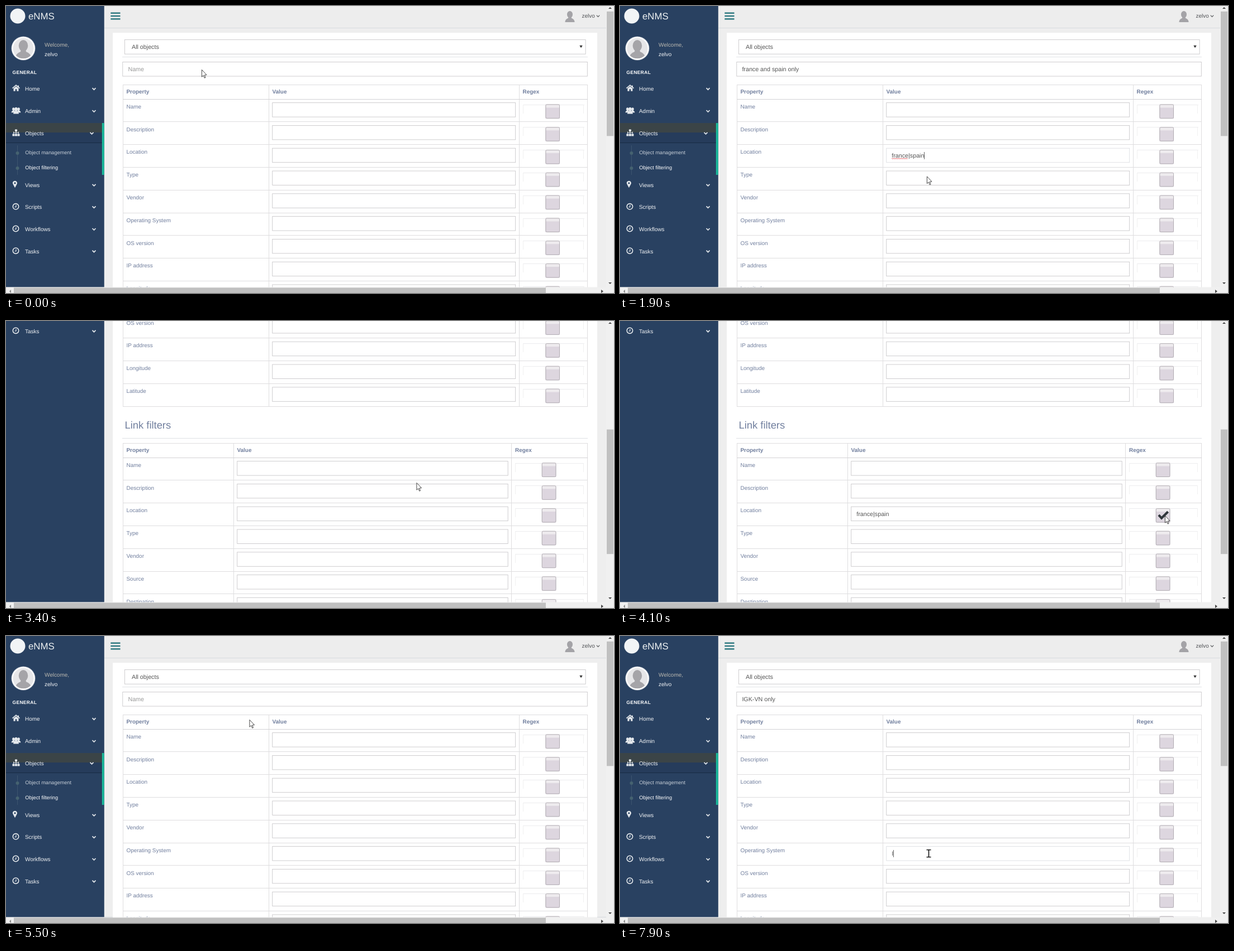
Recreate the animation shown at these times as an HTML page with a canvas. Size 1088 by 515 pixels, loop 8000 ms.

```html
<!DOCTYPE html>
<html lang="en">
<head>
<meta charset="utf-8">
<title>Object filtering</title>
<style>
  html, body { margin: 0; width: 100%; height: 100%; overflow: hidden; background: #eee; }
  canvas { display: block; }
</style>
</head>
<body>
<canvas id="stage" width="1088" height="515"></canvas>
<script>
const ctx = document.getElementById('stage').getContext('2d');
const LOOP = 8000, STEP = 100;
const VIEW_W = 1074, VIEW_H = 504.5, SIDE_W = 175.6, ROW = 40.8;
const NAVY = '#294161', LABEL = '#717f9e', INK = '#555', RULE = '#dedddf';
const USER = 'zelvo';
const FILTER_A = 'france and spain only', FILTER_B = 'IGK-VN only', PLACES = 'france|spain';
const COMMON = ['Name', 'Description', 'Location', 'Type', 'Vendor'];
const OBJECT_ROWS = [...COMMON, 'Operating System', 'OS version', 'IP address', 'Longitude', 'Latitude'];
const LINK_ROWS = [...COMMON, 'Source', 'Destination'];
const OBJECT_TABLE = { top: 140.5, valueX: 470, regexX: 918, boxX: 965.4 };
const LINK_TABLE = { top: 640.5, valueX: 407, regexX: 904.5, boxX: 958.8 };

const SCROLL = [[0, 0], [2900, 0], [3000, 1.2], [3100, 110], [3200, 250], [3300, 370], [3400, 422],
  [4200, 422], [4300, 480], [4400, 560], [4500, 587], [5400, 587], [5500, 0]];

// time, x, y, pointer shape used from that time on
const POINTER = [
  [0, 350, 114, 'arrow'], [100, 351, 117, 'beam'], [700, 351, 117, 'beam'], [900, 551, 277, 'beam'],
  [1800, 551, 277, 'beam'], [1900, 549, 305.5, 'arrow'], [2200, 986, 274, 'arrow'], [2300, 986, 274, 'arrow'],
  [2400, 900, 270, 'beam'], [2600, 818, 268, 'beam'], [2900, 818, 268, 'beam'], [3000, 818, 267, 'beam'],
  [3100, 800, 272, 'arrow'], [3400, 734.5, 290, 'arrow'], [3600, 650, 346, 'beam'], [3800, 650, 346, 'beam'],
  [3900, 800, 347, 'arrow'], [4000, 975, 349, 'arrow'], [4200, 975, 349, 'arrow'], [4500, 750, 410, 'arrow'],
  [4700, 654, 426, 'hand'], [4800, 654, 426, 'hand'], [4900, 656, 430, 'hand'], [5000, 760, 478, 'arrow'],
  [5100, 930, 330, 'arrow'], [5200, 1030, 171, 'arrow'], [5400, 1030, 171, 'arrow'],
  [5500, 435.5, 150, 'arrow'], [5800, 427, 141, 'arrow'], [5900, 427, 141, 'arrow'], [6000, 400, 114, 'beam'],
  [7100, 400, 114, 'beam'], [7600, 552.5, 390, 'beam'],
];

function track(keys, t) {
  let i = keys.length - 1;
  while (keys[i][0] > t) i--;
  const a = keys[i], b = keys[i + 1] || a;
  const k = b === a ? 0 : (t - a[0]) / (b[0] - a[0]);
  return a.slice(1).map((v, j) => typeof v === 'number' ? v + (b[j + 1] - v) * k : v);
}

// Characters visible at time t when typing runs from the first to the last keystroke
function typed(text, t, first, last) {
  const share = (t - first + STEP) / (last - first + STEP);
  return text.slice(0, Math.max(0, Math.ceil(share * text.length)));
}

function focusAt(t) {
  if (t >= 100 && t < 900 || t >= 6100 && t < 7700) return 'title';
  if (t >= 900 && t < 2300 || t >= 2500 && t < 3600) return 'objectLocation';
  if (t >= 3600 && t < 4100) return 'linkLocation';
  return t >= 7700 ? 'system' : '';
}

function stateAt(t) {
  const second = t >= 5500;
  // the last two letters follow after a pause
  const name = second
    ? typed(FILTER_B.slice(0, -2), t, 6300, 6700) + typed(FILTER_B.slice(-2), t, 6900, 7000)
    : typed(FILTER_A, t, 200, 700);
  return {
    name,
    focus: focusAt(t),
    location: second ? '' : typed(PLACES, t, 1000, 1600),
    selected: t >= 2600 && t < 3600,
    objectCheck: !second && t >= 2300,
    link: !second && t >= 3700 ? PLACES : '',
    linkCheck: !second && t >= 4100,
    system: t >= 7900 ? FILTER_B[0] : '',
    scroll: track(SCROLL, t)[0],
  };
}

let offset = 0;

function fill(x, y, w, h, color) {
  ctx.fillStyle = color;
  ctx.fillRect(x, y, w, h);
}
// soft: page rectangle at its exact place; rect: snapped to whole pixels
const soft = (x, y, w, h, color) => fill(x, y - offset, w, h, color);
const rect = (x, y, w, h, color) =>
  fill(Math.round(x), Math.round(y - offset), Math.round(w), Math.round(h), color);

function frame(x, y, w, h, color) {
  ctx.strokeStyle = color;
  ctx.lineWidth = .85;
  ctx.strokeRect(x + .4, y - offset + .4, w - .8, h - .8);
}

function font(size, bold) {
  ctx.font = `${bold ? 'bold ' : ''}${size}px "Liberation Sans", Arial, sans-serif`;
}
function text(str, x, y, color, size = 9.94, bold = false) {
  font(size, bold);
  ctx.fillStyle = color;
  ctx.fillText(str, x, y - offset);
}

function poly(points, color, stroke, width = 1, close = true) {
  ctx.beginPath();
  points.forEach(([x, y]) => ctx.lineTo(x, y));
  if (close) ctx.closePath();
  if (color) { ctx.fillStyle = color; ctx.fill(); }
  if (stroke) { ctx.strokeStyle = stroke; ctx.lineWidth = width; ctx.stroke(); }
}
function disc(x, y, rx, color, ry = rx) {
  ctx.beginPath();
  ctx.ellipse(x, y, rx, ry, 0, 0, 7);
  ctx.fillStyle = color;
  ctx.fill();
}
function at(x, y, draw) {
  ctx.save();
  ctx.translate(x, y);
  draw();
  ctx.restore();
}

const chevron = (x, y, color, size = 3, width = 1.7) =>
  poly([[x - size, y - size / 2], [x, y + size / 2], [x + size, y - size / 2]], null, color, width, false);

function person(x, y, s, color) {
  disc(x, y - 3.5 * s, 5 * s, color, 6.2 * s);
  ctx.fillStyle = color;
  ctx.beginPath();
  ctx.moveTo(x - 8.5 * s, y + 10.3 * s);
  ctx.quadraticCurveTo(x - 8.5 * s, y + 5 * s, x - 3 * s, y + 3 * s);
  ctx.lineTo(x - 2.5 * s, y);
  ctx.lineTo(x + 2.5 * s, y);
  ctx.lineTo(x + 3 * s, y + 3 * s);
  ctx.quadraticCurveTo(x + 8.5 * s, y + 5 * s, x + 8.5 * s, y + 10.3 * s);
  ctx.fill();
}

const ICON = '#e4e8ec';
const icons = {
  home() {
    poly([[-6.5, 0], [0, -5.5], [6.5, 0]], null, ICON, 1.7, false);
    poly([[-4.5, 0], [0, -3.5], [4.5, 0], [4.5, 5], [1.3, 5], [1.3, 1.5], [-1.3, 1.5], [-1.3, 5], [-4.5, 5]], ICON);
    fill(3, -5, 2, 3, ICON);
  },
  users() {
    for (const [x, y, s] of [[-4.6, -1, .45], [4.6, -1, .45], [0, 0, .58]]) person(x, y, s, ICON);
  },
  sitemap() {
    fill(-2, -6, 4, 4, ICON);
    for (const x of [-6.5, -2, 2.5]) fill(x, 2, 4, 4, ICON);
    fill(-5, -.5, 10, 1, ICON);
    for (const x of [-5, -.5, 4]) fill(x, -2, 1, 4, ICON);
  },
  marker() {
    ctx.beginPath();
    ctx.arc(-2, -2.5, 4, Math.PI * .9, Math.PI * 2.1);
    ctx.lineTo(-2, 6);
    ctx.fillStyle = ICON;
    ctx.fill();
    disc(-2, -2.5, 1.6, NAVY);
  },
  clock() {
    ctx.beginPath();
    ctx.arc(-.5, 0, 5.2, 0, 7);
    ctx.strokeStyle = ICON;
    ctx.lineWidth = 1.6;
    ctx.stroke();
    poly([[0, -3], [0, .8], [-2.5, .8]], null, ICON, 1.2, false);
  },
};
const MENU = [['Home', 148.7, 'home'], ['Admin', 188.5, 'users'], ['Objects', 228.4, 'sitemap'], ['Views', 321.3, 'marker'],
  ['Scripts', 360.8, 'clock'], ['Workflows', 400.5, 'clock'], ['Tasks', 440.2, 'clock']];

function drawSidebar() {
  fill(0, 0, SIDE_W, VIEW_H, NAVY);
  disc(21, 18 - offset, 13.5, '#f1f4f6');
  text('eNMS', 40, 23.7, '#ecf0f1', 16.83);

  disc(31, 76 - offset, 21.6, '#8a97a8');
  disc(31, 76 - offset, 20.9, '#fff');
  ctx.save();
  ctx.beginPath();
  ctx.arc(31, 76 - offset, 18.5, 0, 7);
  ctx.clip();
  soft(10, 50, 42, 50, '#e6e6e8');
  person(31, 77 - offset, 1.65, '#a5a4a8');
  ctx.restore();
  text('Welcome,', 69, 73.4, '#bab8b0');
  text(USER, 69, 90, '#f4f6f8');
  ctx.letterSpacing = '0.38px';
  text('GENERAL', 11.5, 121.5, '#fff', 8.42, true);
  ctx.letterSpacing = '0px';

  rect(0, 210, 172, 17, '#3b4447');
  rect(0, 227, 172, 18, '#263c5b');
  rect(0, 245, 172, 1, '#182a44');
  soft(171.8, 210, 3.8, 93, '#1abb9c');
  rect(20, 250, 1, 53, '#3c5570');
  disc(20.5, 264 - offset, 3, '#456270');
  disc(20.5, 291 - offset, 3, '#456270');
  text('Object management', 34.3, 266, '#c6ced7', 9.2);
  text('Object filtering', 34.3, 293, '#fff', 9.2);

  for (const [label, y, icon] of MENU) {
    at(18, y - 1 - offset, icons[icon]);
    text(label, 34, y + 3.6, '#f0f2f4');
    chevron(label === 'Objects' ? 153.5 : 157.5, y - offset, ICON);
  }
}

function drawHeader() {
  rect(176, 0, 898, 40, '#ededed');
  rect(176, 39, 898, 1, '#d8dbdf');
  for (let i = 0; i < 3; i++) soft(187.3, 11.4 + i * 5.3, 17.2, 2.6, '#357d84');
  person(1009, 18.7 - offset, 1, '#a4a3a7');
  text(USER, 1030.5, 21, '#515356');
  chevron(1059.5, 18 - offset, '#515356', 2.7, 1.1);
}

function squiggle(x, y, width) {
  const points = [];
  for (let i = 0; i <= width; i += 1.5) points.push([x + i, y - offset + (points.length % 2 ? 1 : -.5)]);
  poly(points, null, '#e0393e', .9, false);
}

function input(x, y, w, value = '', o = {}) {
  const height = 26.3, left = x + 10, base = y + 17;
  soft(x, y, w, height, '#fff');
  frame(x, y, w, height, o.focused ? '#dbdde1' : '#c6c4c7');
  font(10.71);
  const width = ctx.measureText(value).width;
  if (o.selected) rect(left, base - 10.5, width, 13, '#3397ef');
  if (value) text(value, left, base, o.selected ? '#fff' : INK, 10.71);
  else if (o.placeholder) text(o.placeholder, left, base, '#999', 10.71);
  if (o.spelling && value.length > 5) squiggle(left, base + 1.8, ctx.measureText('france').width);
  if (o.focused && !o.selected) rect(left + width, base - 10, 1, 13, '#666');
}

function checkbox(x, y, checked) {
  const size = 25.6;
  soft(x, y, size, size, '#ddd6df');
  soft(x, y, size, 6, '#eeebee');
  ctx.strokeStyle = '#aca8ad';
  ctx.lineWidth = .9;
  ctx.beginPath();
  ctx.roundRect(x + .45, y - offset + .45, size - .9, size - .9, 2);
  ctx.stroke();
  if (checked) at(x, y - offset, () =>
    poly([[5.2, 12.2], [10.3, 17.8], [21.8, 6.3]], null, '#30363b', 4.2, false));
}

function table({ top, valueX, regexX, boxX }, rows, cells) {
  const body = top + 27, bottom = body + rows.length * ROW;
  for (const x of [208.5, valueX - .5, regexX - .5, 1039.5]) rect(x, top, 1, bottom - top, RULE);
  rect(208.5, top, 832, 1, RULE);
  rect(208.5, body - 1, 832, 1, '#d3d2d5');
  [['Property', 215.5], ['Value', valueX + 6.5], ['Regex', regexX + 6.5]]
    .forEach(([label, x]) => text(label, x, top + 16.6, LABEL, 9.94, true));
  rows.forEach((label, i) => {
    const y = body + i * ROW;
    rect(208.5, y + ROW - 1, 832, 1, RULE);
    text(label, 215.5, y + 16.2, LABEL);
    const cell = cells[label] || {};
    input(valueX + 6.3, y + 5.7, regexX - valueX - 12.2, cell.value, cell);
    const left = regexX + 6.5;
    rect(left, y + 9, 1034 - left, 1, '#ececee');
    rect(left, y + 9, 1, 16, '#f0f0f1');
    rect(1033, y + 9, 1, 16, '#f0f0f1');
    checkbox(boxX, y + 8.9, cell.checked);
  });
}

function button(label, x, w, color, border) {
  soft(x, 1000.4, w, 26, color);
  frame(x, 1000.4, w, 26, border);
  text(label, x + 9.7, 1017, '#fff', 10.71);
}

function drawPage(s) {
  fill(SIDE_W, 0, VIEW_W - SIDE_W, VIEW_H, '#eee');
  drawHeader();
  rect(191, 48, 867, 994, '#fff');

  frame(212, 60, 825.5, 26.6, '#c6c4c7');
  text('All objects', 225, 76.6, INK, 10.71);
  poly([[1026.3, 70.7 - offset], [1031.7, 70.7 - offset], [1029, 75.3 - offset]], '#333');
  rect(208, 91, 833, 1, '#e2e3e7');
  input(208.4, 100.1, 832.3, s.name, { placeholder: 'Name', focused: s.focus === 'title' });

  table(OBJECT_TABLE, OBJECT_ROWS, {
    Location: { value: s.location, focused: s.focus === 'objectLocation', selected: s.selected, spelling: true, checked: s.objectCheck },
    'Operating System': { value: s.system, focused: s.focus === 'system' },
  });
  text('Link filters', 212.5, 615, LABEL, 18.36);
  rect(208, 631.5, 833, 1, '#dfe0e4');
  table(LINK_TABLE, LINK_ROWS, {
    Location: { value: s.link, focused: s.focus === 'linkLocation', checked: s.linkCheck },
  });

  rect(208, 985, 833, 1, '#e8e9ec');
  button('Reset', 563.5, 47.5, '#3173b5', '#2a66a3');
  button('Save', 617.5, 45, '#397c43', '#265d30');
  soft(SIDE_W, 1053, VIEW_W - SIDE_W, 38, '#fff');
  soft(SIDE_W, 1091, VIEW_W - SIDE_W, 1, NAVY);
  text('eNMS - A vendor-agnostic Network Management System for carrier-grade networks.', 191.5, 1075.3, LABEL);
}

function drawScrollbars(scroll) {
  const groove = '#f0f0f0', thumb = '#c0c0c0', arrow = '#444';
  fill(VIEW_W, 0, 14, 515, groove);
  fill(0, VIEW_H, 1088, 11, groove);
  fill(1075, 9.8 + scroll * .438, 12, 223.5, thumb);
  fill(14, 505.5, 952, 9.5, thumb);
  poly([[1078, 5], [1084, 5], [1081, 2]], arrow);
  poly([[1078, 496], [1084, 496], [1081, 499]], arrow);
  poly([[9, 509], [9, 515], [6, 512]], '#888');
  poly([[1065, 509], [1065, 515], [1069, 512]], arrow);
}

const pointers = {
  arrow() {
    poly([[.4, .4], [.4, 13.2], [3.3, 10.6], [5.2, 15.2], [7, 14.4], [5.2, 10], [9, 9.6]], '#fff', '#333', .9);
  },
  beam() {
    for (const y of [-7, 6]) fill(-4, y, 8, 1.4, '#111');
    fill(-.8, -7, 1.6, 14, '#111');
  },
  hand() {
    ctx.beginPath();
    ctx.moveTo(2.5, 10);
    ctx.lineTo(2.5, 1.5);
    ctx.quadraticCurveTo(3.8, -1, 5, 1.5);
    ctx.lineTo(5, 5);
    ctx.lineTo(10, 6.5);
    ctx.quadraticCurveTo(11.5, 7, 11, 10);
    ctx.lineTo(9.5, 15.5);
    ctx.lineTo(3.5, 15.5);
    ctx.lineTo(-1.5, 9.5);
    ctx.quadraticCurveTo(-1, 7.5, 2.5, 10);
    ctx.fillStyle = '#fff';
    ctx.fill();
    ctx.strokeStyle = '#222';
    ctx.lineWidth = 1;
    ctx.stroke();
    for (const x of [6.5, 8.7]) fill(x, 7, .7, 2.5, '#222');
  },
};

function render(now) {
  const t = Math.floor(now % LOOP / STEP) * STEP;
  const state = stateAt(t);
  ctx.textRendering = 'geometricPrecision';
  offset = state.scroll;
  drawPage(state);
  drawSidebar();
  drawScrollbars(state.scroll);
  const [x, y, shape] = track(POINTER, t);
  at(x, y, pointers[shape]);
}

const start = performance.now();
function tick() {
  render(performance.now() - start);
  requestAnimationFrame(tick);
}
tick();
</script>
</body>
</html>
```
